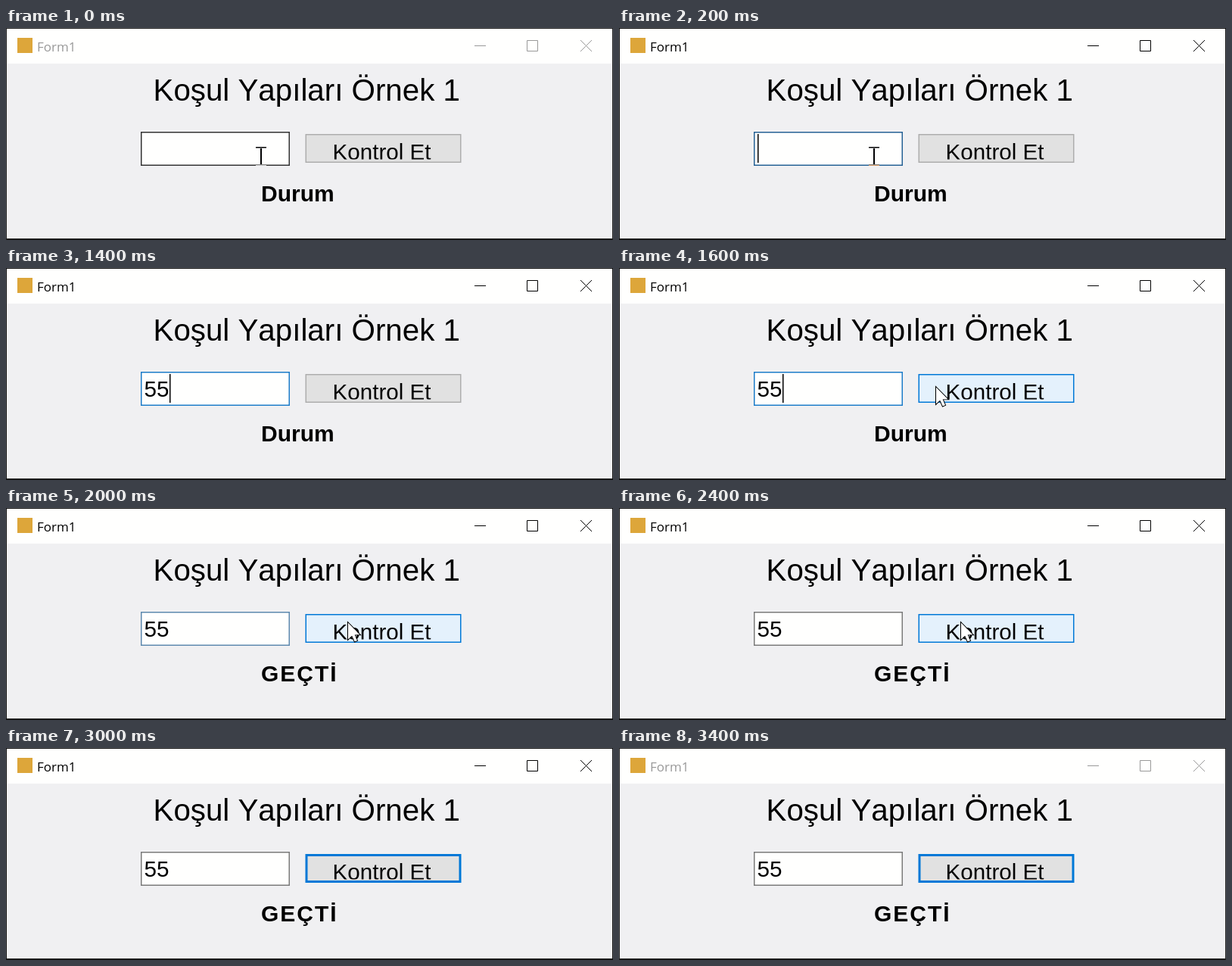
These frames come from a looping animation (802x280 px, 3.6 s). An HTML page with a canvas:

```html
<!DOCTYPE html>
<html lang="tr">
<head>
<meta charset="utf-8">
<style>
  html, body { margin: 0; width: 100%; height: 100%; overflow: hidden; }
  canvas { display: block; }
</style>
</head>
<body>
<canvas id="stage" width="802" height="280"></canvas>
<script>
const ctx = document.getElementById('stage').getContext('2d');
const SANS = '"Liberation Sans", Arial, sans-serif';
const LOOP = 3600, STEP = 200;
const BLUE = '#0078d7', GREY = '#7a7a7a', DARK = '#333';

// Each entry changes part of the state from its time onwards.
const timeline = [
  [0, { active: false, border: DARK, ibeam: [337, 157], arrow: null, caret: 0,
        value: '', status: 'Durum', button: 'normal' }],
  [200, { active: true, border: '#256195', caret: 183 }],
  [400, { ibeam: [334, 150] }],
  [600, { border: '#1c7cc9' }],
  [1000, { ibeam: null }],
  [1400, { value: '55', caret: 216 }],
  [1600, { arrow: [418.5, 156.5], button: 'hover' }],
  [1800, { arrow: [461.5, 150.5] }],
  [2000, { arrow: [451.5, 150.5], status: 'GEÇTİ', caret: 0, border: '#5d89ae' }],
  [2200, { border: GREY }],
  [2600, { arrow: [291.5, 207.5], button: 'focused', border: DARK }],
  [2800, { arrow: null, border: GREY }],
  [3400, { active: false }]
];

const buttonStyles = {
  normal: { fill: '#e1e1e1', line: '#adadad', width: 1.5 },
  hover: { fill: '#e4f1fc', line: BLUE, width: 1.5 },
  focused: { fill: '#e1e1e1', line: BLUE, width: 3 }
};

function stateAt(time) {
  const parts = timeline.filter(([start]) => start <= time).map(([, part]) => part);
  return Object.assign({}, ...parts);
}

function rect(x, y, w, h, color) {
  ctx.fillStyle = color;
  ctx.fillRect(x, y, w, h);
}

function box(x, y, w, h, fill, line, width) {
  rect(x, y, w, h, line);
  rect(x + width, y + width, w - 2 * width, h - 2 * width, fill);
}

function text(string, x, y, font, color = '#000', spacing = 0) {
  ctx.font = font;
  ctx.fontKerning = 'none';
  ctx.letterSpacing = spacing + 'px';
  ctx.fillStyle = color;
  ctx.fillText(string, x, y);
}

function drawWindow(active) {
  const ink = active ? '#000' : '#999';
  box(0, 0, 802, 280, '#f0f0f2', active ? '#111' : '#222', 1);
  rect(1, 278, 800, 2, '#1a1a1a');
  rect(1, 1, 800, 46, '#fffffe');
  rect(15, 13, 20, 20, '#dda63a');
  text('Form1', 41, 31, '17px "Open Sans", sans-serif', ink);

  ctx.strokeStyle = ink;
  ctx.lineWidth = 1;
  ctx.beginPath();
  ctx.moveTo(619, 23.5);
  ctx.lineTo(634, 23.5);
  ctx.rect(688.5, 16.5, 14, 14);
  ctx.moveTo(759, 16);
  ctx.lineTo(774, 31);
  ctx.moveTo(774, 16);
  ctx.lineTo(759, 31);
  ctx.stroke();
}

function drawButton(style) {
  const { fill, line, width } = buttonStyles[style];
  box(395.5, 140, 206, 38, fill, line, width);
  ctx.save();
  ctx.beginPath();
  ctx.rect(400, 142, 198, 31.5);
  ctx.clip();
  text('Kontrol Et', 431.5, 174, '29.6px ' + SANS);
  ctx.restore();
}

function drawIbeam(x, y) {
  ctx.save();
  ctx.globalCompositeOperation = 'difference';
  for (const serif of [0, 23.5]) rect(x - 7, y + serif, 14, 1.5, '#fff');
  rect(x - 1, y + 1.5, 2, 22, '#fff');
  ctx.restore();
}

function drawArrow(x, y) {
  ctx.save();
  ctx.translate(x, y);
  ctx.fillStyle = '#fff';
  ctx.strokeStyle = '#000';
  ctx.lineWidth = 1.1;
  ctx.stroke(new Path2D('M0 0V24L5.5 18.8L9 26.5L13 24.8L9.7 17.3H17Z'));
  ctx.fill(new Path2D('M.5 1.2V22.8L5.7 18L9.3 25.8L12.3 24.5L9 16.8H15.8Z'));
  ctx.restore();
}

function draw(time) {
  const s = stateAt(time);
  drawWindow(s.active);
  text('Koşul Yapıları Örnek 1', 194.5, 95.5, '40.3px ' + SANS);
  box(178, 137, 197, 45, '#fffffe', s.border, 1.5);
  text(s.value, 182.5, 170, '29.7px ' + SANS);
  if (s.caret) rect(s.caret, 140, 1.5, 38, '#000');
  drawButton(s.button);
  text(s.status, 337, 228.5, 'bold 30px ' + SANS, '#000', s.status === 'Durum' ? 0 : 2);
  if (s.ibeam) drawIbeam(...s.ibeam);
  if (s.arrow) drawArrow(...s.arrow);
}

function tick() {
  draw(Math.floor(performance.now() % LOOP / STEP) * STEP);
  requestAnimationFrame(tick);
}
tick();
</script>
</body>
</html>
```
